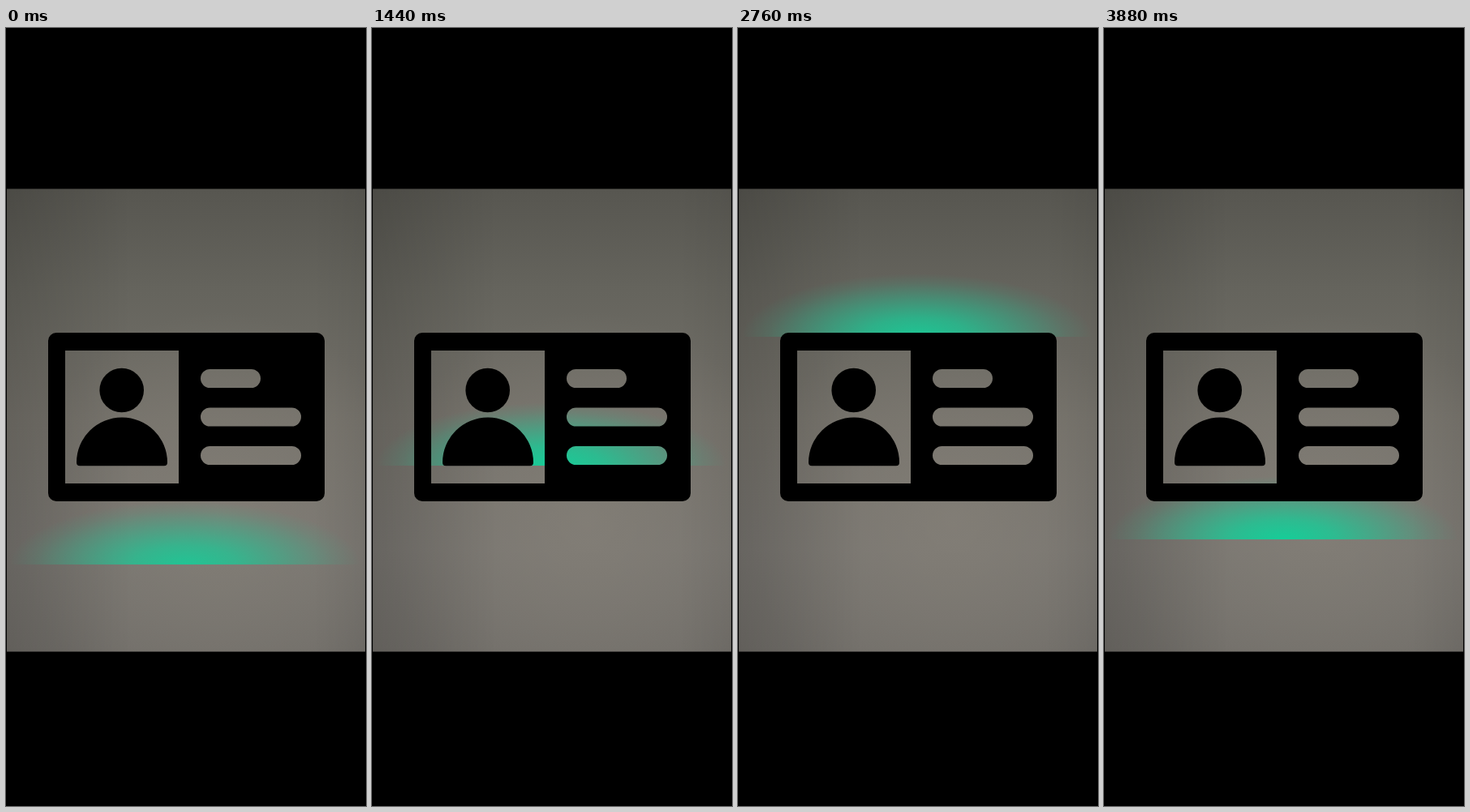
Write an HTML page that moves like this. It is 444x960 px and loops after 3920 ms.

```html
<!DOCTYPE html>
<html lang="en">
<head>
<meta charset="utf-8">
<title>Card scan</title>
<style>
  html, body { margin: 0; width: 100%; height: 100%; overflow: hidden; background: #000; }
  svg { display: block; width: 444px; height: 960px; }
</style>
</head>
<body>
<svg viewBox="0 0 444 960">
  <defs>
    <linearGradient id="wall" x1="0" y1="0" x2="0" y2="1">
      <stop offset="0" stop-color="#575650"/>
      <stop offset=".22" stop-color="#65645d"/>
      <stop offset=".5" stop-color="#74716a"/>
      <stop offset=".78" stop-color="#787570"/>
      <stop offset="1" stop-color="#716e69"/>
    </linearGradient>
    <radialGradient id="light" gradientUnits="userSpaceOnUse" cx="0" cy="0" r="1"
      gradientTransform="translate(265 610) scale(250 260)">
      <stop offset="0" stop-color="#88837a" stop-opacity=".6"/>
      <stop offset="1" stop-color="#88837a" stop-opacity="0"/>
    </radialGradient>
    <linearGradient id="shade">
      <stop offset="0" stop-opacity=".14"/>
      <stop offset=".35" stop-opacity="0"/>
      <stop offset=".85" stop-opacity="0"/>
      <stop offset="1" stop-opacity=".05"/>
    </linearGradient>
    <radialGradient id="beam" gradientUnits="userSpaceOnUse" cx="0" cy="0" r="1"
      gradientTransform="scale(216 78)">
      <stop offset="0" stop-color="#16cd98"/>
      <stop offset=".3" stop-color="#16cd98" stop-opacity=".78"/>
      <stop offset=".6" stop-color="#16cd98" stop-opacity=".42"/>
      <stop offset=".85" stop-color="#16cd98" stop-opacity=".12"/>
      <stop offset="1" stop-color="#16cd98" stop-opacity="0"/>
    </radialGradient>
    <clipPath id="frame"><rect x="1" y="198.5" width="442" height="571"/></clipPath>
  </defs>

  <rect width="444" height="960"/>
  <g clip-path="url(#frame)">
    <rect y="198" width="444" height="572" fill="url(#wall)"/>
    <rect y="198" width="444" height="572" fill="url(#light)"/>
    <rect y="198" width="444" height="572" fill="url(#shade)"/>
    <path id="glow" d="M-216 0A216 78 0 0 1 216 0Z" fill="url(#beam)"/>
  </g>

  <!-- Card with cut-out window and text bars -->
  <path fill-rule="evenodd" d="
    M62 376H383a10 10 0 0 1 10 10V574a10 10 0 0 1 -10 10H62a10 10 0 0 1 -10 -10V386a10 10 0 0 1 10 -10Z
    M73 398V562H213V398Z
    M251.5 421H302.5a11.5 11.5 0 0 1 0 23H251.5a11.5 11.5 0 0 1 0 -23Z
    M251.5 468.5H352.5a11.5 11.5 0 0 1 0 23H251.5a11.5 11.5 0 0 1 0 -23Z
    M251.5 516H352.5a11.5 11.5 0 0 1 0 23H251.5a11.5 11.5 0 0 1 0 -23Z"/>
  <circle cx="142.7" cy="447" r="27.3"/>
  <path d="M87 536A56 55.5 0 0 1 199 536Q199 540.3 195 540.3H91Q87 540.3 87 536Z"/>
</svg>
<script>
  const LOOP = 3920, STEP = 40, TOP = 300, BOTTOM = 740, FADE = 88;
  // Each sweep is a run of [ms, y] points.
  const sweeps = [
    [[0, 662], [358, BOTTOM]],
    [[358, 304], [800, 400], [1120, 466], [1440, 540], [1680, 591], [2160, 692], [2240, 711], [2375, BOTTOM]],
    [[2375, TOP], [2760, 381], [3360, 514], [3400, 528], [3880, 631], [LOOP, 640]]
  ];
  const glow = document.getElementById('glow');
  const start = performance.now();

  function lineY(t) {
    const pts = sweeps.find(s => t < s[s.length - 1][0]);
    const i = pts.findIndex(p => t < p[0]);
    const [t0, y0] = pts[i - 1], [t1, y1] = pts[i];
    return y0 + (y1 - y0) * (t - t0) / (t1 - t0);
  }

  function draw() {
    const now = (performance.now() - start) % LOOP;
    const y = lineY(Math.floor(now / STEP) * STEP);
    const alpha = Math.min(1, (y - TOP) / FADE, (BOTTOM - y) / FADE);
    glow.setAttribute('transform', `translate(221 ${y.toFixed(2)})`);
    glow.setAttribute('opacity', Math.max(0, alpha).toFixed(3));
    requestAnimationFrame(draw);
  }
  draw();
</script>
</body>
</html>
```
